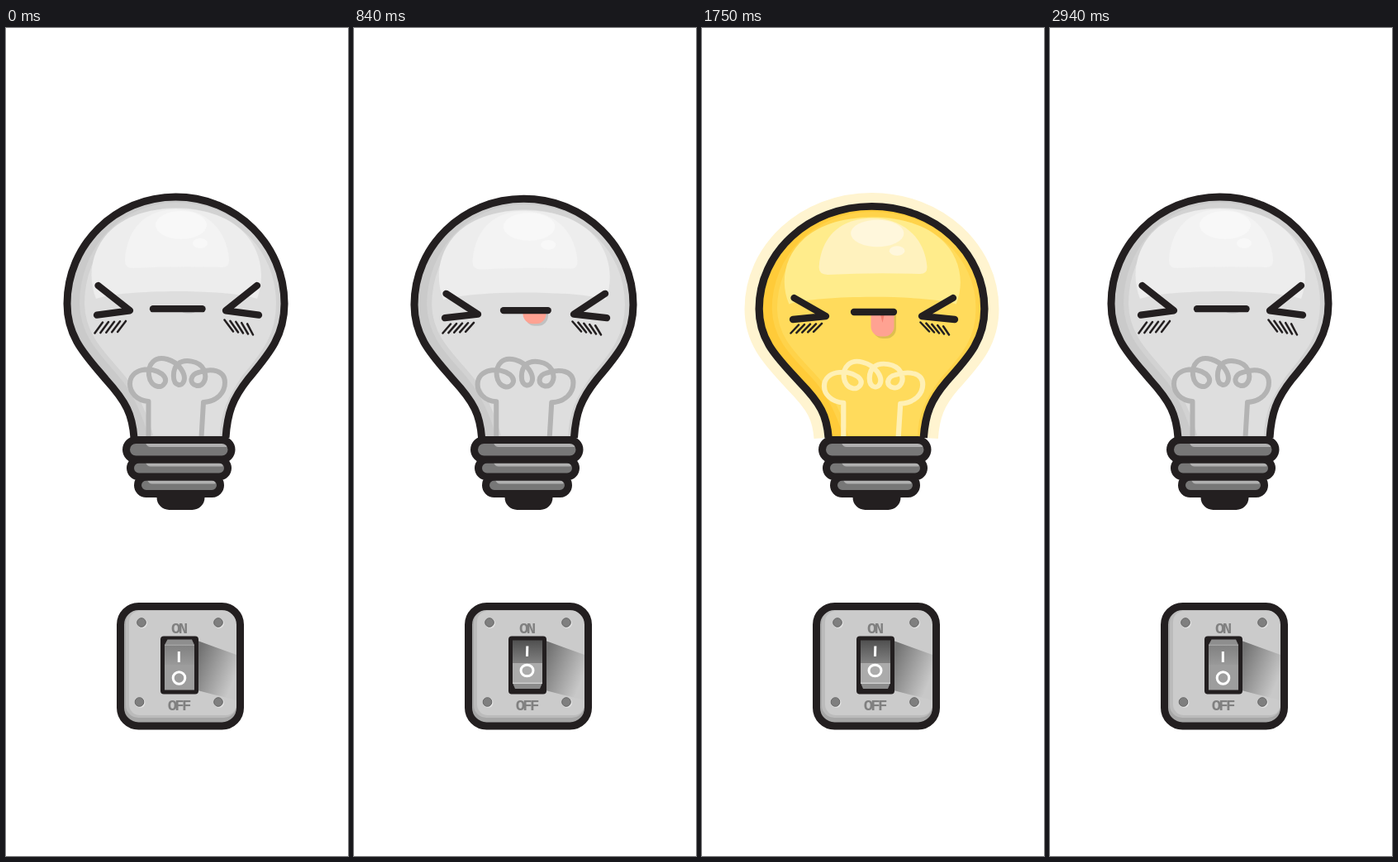
These frames come from a looping animation (414 px wide and 1000 px high, 3150 ms). An HTML page:

```html
<!DOCTYPE html>
<html lang="en">
<head>
<meta charset="utf-8">
<title>Light bulb</title>
<style>
  html, body { margin: 0; width: 100%; height: 100%; overflow: hidden; background: #fff; }
  svg { display: block; width: 100vw; height: 100vh; --ink: #231f20;
    --edge: #cacaca; --mid: #d2d2d2; --main: #dedede; --top: #ededed;
    --blob: #f3f3f3; --shine: #f8f8f8; --wire: #b3b3b3; --glow: none; }
  svg.lit { --edge: #ffcb39; --mid: #ffd34a; --main: #ffdb5c; --top: #ffec8b;
    --blob: #fff2be; --shine: #fff7dc; --wire: #fff0b5; --glow: #fff4d0; }
  .ink { fill: none; stroke: var(--ink); stroke-width: 9; }
  .face { fill: none; stroke: var(--ink); stroke-width: 8.3; stroke-linecap: round; stroke-linejoin: round; }
  .thin { stroke-width: 2.5; }
  .mark { fill: none; stroke: #fff; stroke-width: 3; }
  text { font: bold 19px "Liberation Mono", monospace; letter-spacing: -2.7px; fill: #808080; text-anchor: middle; }
</style>
</head>
<body>
<svg id="stage" viewBox="0 0 414 1000">
  <defs>
    <path id="glass" d="M155 495C153 467 146 452 120.500 424C97 396 74 374 74 333C74 262 132 204 205.500 204C279 204 337 262 337 333C337 374 316 396 293 424C274 448 268 465 266 495"/>
    <linearGradient id="cast" gradientUnits="userSpaceOnUse" x1="230" y1="762" x2="278" y2="782">
      <stop stop-color="#737373"/><stop offset="1" stop-color="#c8c8c8"/>
    </linearGradient>
    <linearGradient id="upperOff" x2="0" y2="1"><stop stop-color="#808080"/><stop offset="1" stop-color="#999"/></linearGradient>
    <linearGradient id="upperOn" x2="0" y2="1"><stop stop-color="#505050"/><stop offset="1" stop-color="#808080"/></linearGradient>
    <clipPath id="belowMouth"><rect id="mouthCut" x="195" y="340" width="50" height="60"/></clipPath>
  </defs>

  <g id="bulb">
    <use href="#glass" fill="none" stroke="var(--glow)" stroke-width="34"/>
    <use href="#glass" fill="var(--edge)"/>
    <path fill="var(--main)" stroke="var(--mid)" stroke-width="6" d="M206 214C140 214 92 268 92 333C93 375 121 396 143 424C160 446 169 470 176 495H262C262 465 272 446 289 421C314 392 330 370 330 333C330 266 278 214 206 214"/>
    <path fill="var(--top)" d="M109 327C91 282 116 218 206 218C296 218 321 282 304 327C270 315 144 315 109 327"/>
    <path fill="var(--blob)" d="M154 290Q143 290 144 279C147 241 170 219 206 219C244 219 267 245 270 279Q271 290 260 289Q207 287 154 290"/>
    <g fill="var(--shine)"><ellipse cx="212" cy="238" rx="31" ry="17"/><ellipse cx="235" cy="260" rx="9" ry="6"/></g>
    <path fill="none" stroke="var(--wire)" stroke-width="6" stroke-linejoin="round" d="M172.500 494V451C158 450 150 440 150 430C150 411 176 408 189 418C198 426 190 434 184 433C171 431 170 410 178 403C186 395 204 400 212 412C220 424 214 432 209 431C200 429 202 411 208 406C216 399 234 402 239 412C245 424 238 433 231 432C221 430 223 418 233 416C250 410 265 414 265 428C265 440 256 451 239 452L236.500 494"/>
    <use href="#glass" class="ink"/>
  </g>

  <g id="base">
    <path fill="var(--ink)" d="M182.500 562H240.500V567A15 15 0 0 1 225.500 582H197.500A15 15 0 0 1 182.500 567Z"/>
  </g>

  <g id="face">
    <g clip-path="url(#belowMouth)">
      <g id="tongue">
        <rect x="207" y="322" width="28" height="53" rx="12" opacity=".13"/>
        <rect x="204.500" y="320" width="28" height="52.500" rx="12" fill="#ffa292"/>
        <path d="M214.500 340H222L218.500 356Z" fill="#f37f6f"/>
      </g>
    </g>
    <path id="mouth" class="face"/>
    <path id="eyes" class="face"/>
    <path id="blush" class="face thin"/>
  </g>

  <g id="panel">
    <rect x="138.500" y="698.500" width="145" height="144.500" rx="22" fill="#a6a6a6"/>
    <rect x="145" y="703" width="134" height="130" rx="15" fill="#bbb"/>
    <rect x="149" y="704" width="130" height="126" rx="13" fill="#cbcbcb"/>
    <path d="M232 740L279 757V812L232 800Z" fill="url(#cast)"/>
    <rect x="138.500" y="698.500" width="145" height="144.500" rx="22" class="ink"/>
    <text x="208.700" y="731">ON</text>
    <text x="208.700" y="823.500">OFF</text>
    <rect x="187" y="734.500" width="46" height="70" rx="4" fill="var(--ink)"/>
  </g>
  <g id="rockerOff">
    <path d="M195.500 738.500H225L228 745H192Z" fill="#8e8e8e"/>
    <rect x="192" y="745" width="36" height="24" fill="url(#upperOff)"/>
    <rect x="192" y="769" width="36" height="30.500" fill="#9d9d9d"/>
    <path class="mark" d="M192 745.300H228" stroke-opacity=".35" style="stroke-width:1"/>
    <path class="mark" d="M209.300 753V766"/>
    <circle class="mark" cx="209.500" cy="785" r="7.300"/>
  </g>
  <g id="rockerOn">
    <rect x="192" y="739.500" width="36" height="27" fill="url(#upperOn)"/>
    <rect x="192" y="766.500" width="36" height="24.500" fill="#ababab"/>
    <path d="M192 791H228L225 798H195Z" fill="#8c8c8c"/>
    <path class="mark" d="M192 791.300H228" stroke-opacity=".6" style="stroke-width:1.200"/>
    <path class="mark" d="M209.800 746.500L209.500 759"/>
    <ellipse class="mark" cx="209.500" cy="776" rx="7.500" ry="6.800"/>
  </g>
</svg>
<script>
const LOOP = 3150, STEP = 70;
const LIT = [[70, 210], [350, 420], [700, 770], [1050, 1120], [1260, 1330], [1470, 1540],
  [1750, 1890], [2100, 2170], [2450, 2520], [2800, 2870]];
const get = id => document.getElementById(id);
const clamp = x => Math.max(0, Math.min(1, x));
const mix = (a, b, k) => a + (b - a) * k;
const five = make => [0, 1, 2, 3, 4].map(make).join('');

// Screw threads share their outlines: left, top, width, height, highlight start
for (const [x, y, w, h, hx] of [[159.5, 542, 100, 20.500, 173], [150.5, 521, 118, 21, 171], [145.500, 497.500, 127.5, 23.500, 171]]) {
  const right = x + w - 6, top = y + 4;
  get('base').insertAdjacentHTML('beforeend',
    `<rect x="${x}" y="${y}" width="${w}" height="${h}" rx="${h / 2}" fill="#777"/>
     <path d="M${hx - 2} ${top}H${right}V${top + 4.5}H${hx + 4}Q${hx} ${top + 4.5} ${hx - 2} ${top}" fill="#b0b0b0"/>
     <rect x="${x}" y="${y}" width="${w}" height="${h}" rx="${h / 2}" class="ink"/>`);
}

for (const [x, y] of [[164, 718], [257, 718], [161.5, 814], [257, 814]]) {
  get('panel').insertAdjacentHTML('beforeend',
    `<circle cx="${x + 1}" cy="${y + 1}" r="6" fill="#e2e2e2"/>
     <circle cx="${x}" cy="${y}" r="5.300" fill="#7f7f7f" stroke="#666"/>`);
}

function draw(time) {
  const t = Math.floor(time % LOOP / STEP) * STEP;
  const leaving = t > 2200;
  const amount = leaving ? clamp((2940 - t) / 700) : clamp((t - 350) / 980);
  const squash = amount ** (leaving ? 2 : 2.3);
  const squint = leaving ? squash : clamp((t - 350) / 750);

  get('stage').classList.toggle('lit', LIT.some(([from, to]) => t >= from && t < to));
  get('bulb').setAttribute('transform',
    `translate(205.5 494) scale(${1 + .037 * squash} ${1 - .039 * squash}) translate(-205.5 -494)`);

  const mouthY = mix(339.2, 343, amount);
  get('mouth').setAttribute('d', `M${mix(178, 184, amount)} ${mouthY}H${mix(237.5, 232, amount)}`);
  get('mouthCut').setAttribute('y', mouthY);
  get('tongue').setAttribute('transform', `translate(0 ${-30.5 * (1 - amount)})`);

  const [high, tip, low] = [[311, 326], [341.3, 348], [346.7, 352]].map(([a, b]) => mix(a, b, squint));
  get('eyes').setAttribute('d',
    `M111.500 ${high}L150 ${tip}L110 ${low}M304 ${high}L266 ${tip}L306 ${low}`);
  const drop = 3 * squint;
  get('blush').setAttribute('d', five(i =>
    `M${107.5 + 6.9 * i} ${368.5 - .4 * i}L${117 + 7 * i} ${355.5 - .4 * i + drop}` +
    `M${264.5 + 6.9 * i} ${352.5 + 1.2 * i + drop}L${275 + 6 * i} ${366.5 + i}`));

  const on = t >= 350 && t < 2870;
  get('rockerOn').style.display = on ? '' : 'none';
  get('rockerOff').style.display = on ? 'none' : '';
}

const start = performance.now();
function tick() {
  draw(performance.now() - start);
  requestAnimationFrame(tick);
}
tick();
</script>
</body>
</html>
```
